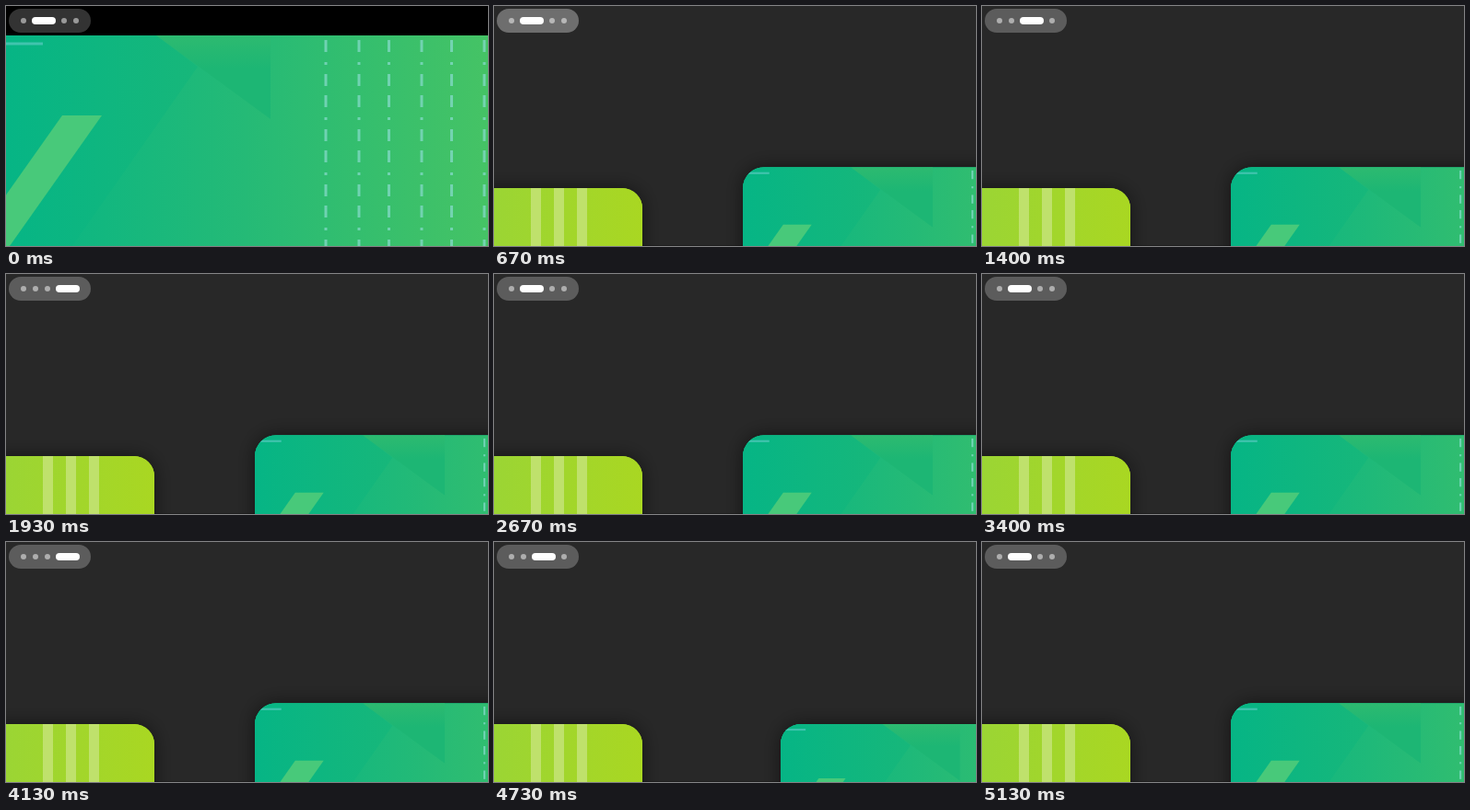
Recreate the animation shown at these times as an HTML page with a canvas. Size 523 by 261 pixels, loop 6.27 s.

```html
<!DOCTYPE html>
<html lang="en">
<head>
<meta charset="utf-8">
<title>Workspace overview</title>
<style>
  html, body { margin: 0; width: 100%; height: 100%; overflow: hidden; background: #000; }
  canvas { display: block; width: 523px; height: 261px; }
</style>
</head>
<body>
<canvas id="stage" width="523" height="261"></canvas>
<script>
const W = 523, H = 261, BAR = 32, LOOP = 6270;
const ctx = document.getElementById('stage').getContext('2d');

// start time, active workspace, pill colour, optional view
const steps = [
  [0, 1, '#333333', 'desktop'],
  [670, 1, '#6e6e6e'],
  [1000, 1, '#5c5c5c'],
  [1400, 2, '#5c5c5c'],
  [1930, 3, '#5c5c5c'],
  [2470, 2, '#5c5c5c'],
  [2670, 1, '#5c5c5c'],
  [2800, 0, '#5c5c5c'],
  [3400, 1, '#5c5c5c'],
  [3800, 2, '#5c5c5c'],
  [4130, 3, '#5c5c5c'],
  [4730, 2, '#5c5c5c', 'inactive'],
  [5130, 1, '#5c5c5c']
];

function gradient(x0, y0, x1, y1, ...colors) {
  const g = ctx.createLinearGradient(x0, y0, x1, y1);
  colors.forEach((c, i) => g.addColorStop(i / (colors.length - 1), c));
  return g;
}

function rect(x, y, w, h, fill) {
  ctx.fillStyle = fill;
  ctx.fillRect(x, y, w, h);
}

function poly(fill, ...pts) {
  ctx.beginPath();
  pts.forEach(([x, y]) => ctx.lineTo(x, y));
  ctx.closePath();
  ctx.fillStyle = fill;
  ctx.fill();
}

function round(x, y, w, h, r, fill) {
  ctx.beginPath();
  ctx.roundRect(x, y, w, h, r);
  ctx.fillStyle = fill;
  ctx.fill();
}

function wallpaper() {
  rect(0, BAR, W, H, gradient(0, 0, W, 0, '#06b585', '#25ba76', '#45c365'));
  poly(gradient(0, 0, 208, 0, '#06b585', '#17b77a'),
    [0, BAR], [163, BAR], [208, 66], [72, 261], [0, 261]);
  poly(gradient(0, BAR, 0, 68, '#2dba70', '#1db674'),
    [163, BAR], [287, BAR], [287, 123]);
  poly('#48c97a', [61, 119], [104, 119], [4, 261], [-39, 261]);
  rect(0, 39.5, 40, 3, '#40c4ae');

  const dash = 'rgba(132, 218, 200, 0.75)';
  for (const x of [347, 383, 415.5, 451, 483.5, 519]) {
    for (let y = 0; y < H; y += 60) {
      if (y) rect(x - 1.5, y + 14, 3, 13, dash);
      rect(x - 1.5, y + 37, 3, 13, dash);
      rect(x - 1.5, y + 61, 3, 3, dash);
    }
  }
}

// Rounded card with a soft shadow; paint() fills its inside.
function card(x, y, w, r, color, paint) {
  ctx.save();
  ctx.shadowColor = 'rgba(0, 0, 0, 0.5)';
  ctx.shadowBlur = 20;
  round(x, y, w, 600, r, color);
  ctx.restore();
  ctx.save();
  ctx.clip();
  paint();
  ctx.restore();
}

function greenCard(x, y, scale) {
  card(x, y, 1400, 32 * scale, '#12b67e', () => {
    ctx.translate(x, y);
    ctx.scale(scale, scale);
    ctx.translate(0, -BAR);
    wallpaper();
  });
}

function limeCard() {
  card(-600, 198, 761, 22, '#a0d62a', () => {
    rect(0, 198, 161, 63, gradient(0, 0, 161, 0, '#9bd534', '#a9d722'));
    for (const x of [40, 65, 90]) rect(x, 198, 11, 63, '#bfe16c');
  });
}

function indicator(active, color) {
  round(3, 3, 89, 26, 13, color);
  for (let i = 0; i < 4; i++) {
    const x = 19 + 13 * i;
    if (i === active) round(x - 4, 12, 26, 8, 4, '#fff');
    else round(x - 3 + (i > active ? 18 : 0), 13, 6, 6, 3, 'rgba(255, 255, 255, 0.5)');
  }
}

function draw(t) {
  const [, active, color, view] = steps.findLast(s => s[0] <= t);
  if (view === 'desktop') {
    rect(0, 0, W, H, '#000');
    wallpaper();
  } else {
    rect(0, 0, W, H, '#282828');
    rect(161, H - 1, W, 1, '#1e1e1e');
    if (active > 0) limeCard();
    if (view === 'inactive') greenCard(311, 198, 0.678);
    else greenCard(270, 175.3, 0.718);
  }
  indicator(active, color);
}

const start = performance.now();
function tick() {
  draw((performance.now() - start) % LOOP);
  requestAnimationFrame(tick);
}
tick();
</script>
</body>
</html>
```
